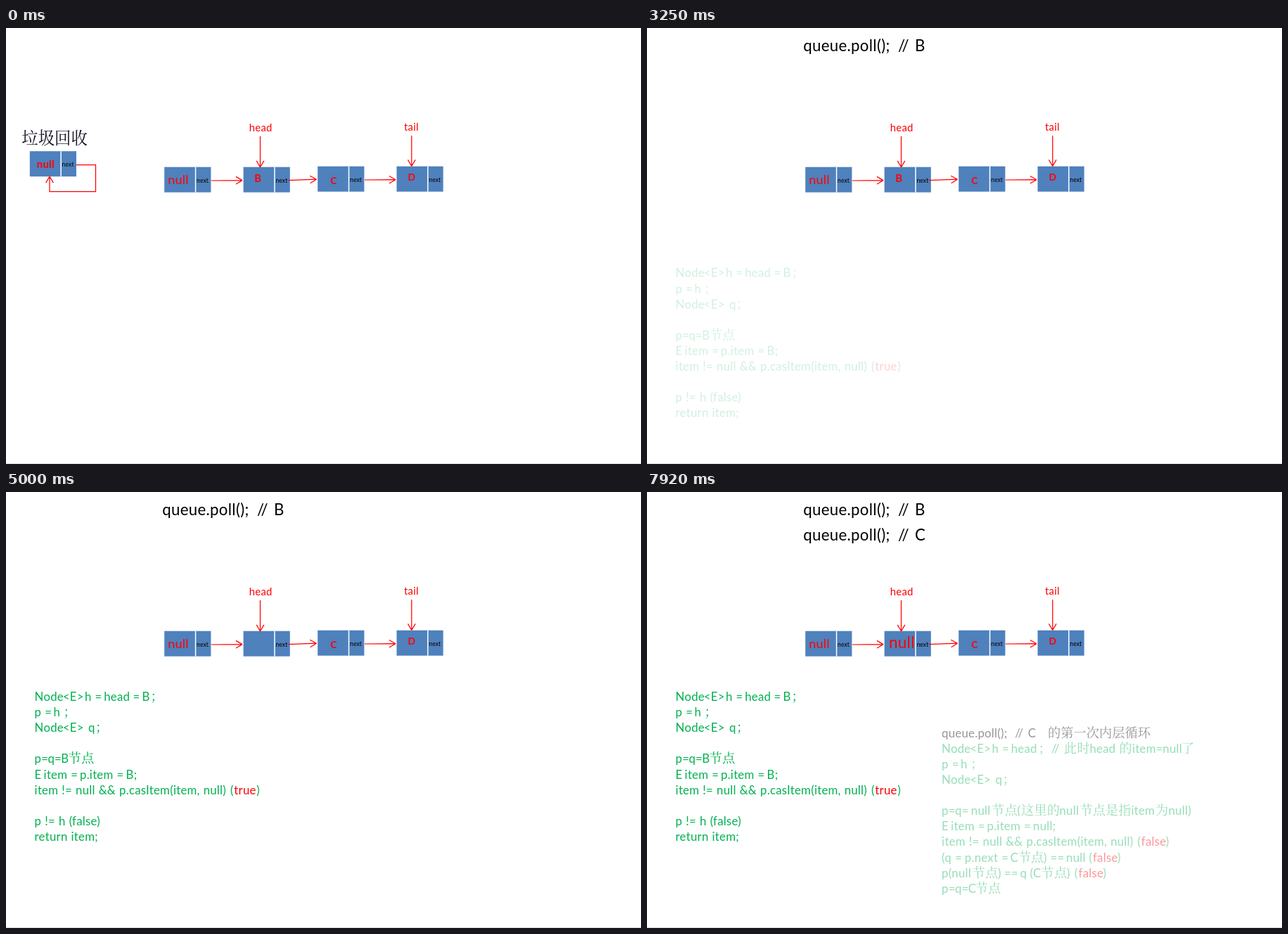
Recreate the animation shown at these times as an HTML page with a canvas. Size 903x620 px, loop 8000 ms.

```html
<!DOCTYPE html>
<html lang="zh">
<head>
<meta charset="utf-8">
<title>Linked queue poll</title>
<style>
  html, body { margin: 0; width: 100%; height: 100%; overflow: hidden; background: #fff; }
  canvas { display: block; }
</style>
</head>
<body>
<canvas id="stage" width="903" height="620"></canvas>
<script>
const ctx = document.getElementById('stage').getContext('2d');
const LOOP = 8000, W = 903, H = 677;   // H: full slide height, the stage crops it
const RED = '#ff0000', GREEN = '#00b050', BLUE = '#4f81bd';
const LATIN = 'Lato, "Open Sans", sans-serif';
const HAN = '"Noto Serif CJK SC", "Noto Sans CJK SC", "Noto Sans CJK", sans-serif';
const LINE = 22.1;

const clamp = v => Math.max(0, Math.min(1, v));
const ramp = (t, start, dur) => clamp((t - start) / dur);

// Motion advances in 80 ms ticks, restarted at the beginning of each scene.
const scenes = [0, 2530, 3410, 4220, 5560, 6810, 7680];
function tick(t) {
  const s = scenes.filter(v => v <= t).pop();
  return s + Math.floor((t - s) / 80) * 80;
}

// Piecewise linear curve through [x, y] points.
function curve(points, u) {
  u = clamp(u);
  for (let i = 1; i < points.length; i++) {
    const [x0, y0] = points[i - 1], [x1, y1] = points[i];
    if (u <= x1) return y0 + (y1 - y0) * (u - x0) / (x1 - x0);
  }
  return 1;
}

const fall = u => curve([[0, 0], [.25, .07], [.5, .2], [.75, .467], [1, 1]], u);
const hop = u => u < .5 ? (1 - fall(1 - 2 * u)) / 2 : .5 + fall(2 * u - 1) / 2;
const glide = (u, first) => curve([[0, 0], [.14, first], [.43, .73], [.71, .91], [1, 1]], u);

// Height above the resting place while bouncing in, as a share of the slide.
function bounce(a) {
  const arc = (p, size) => Math.sin(Math.PI * p) / size;
  if (a < 332) return arc(.5 + fall(a / 332) / 2, 3);
  if (a < 662) return arc(hop((a - 332) / 330), 9);
  if (a < 828) return arc(hop((a - 662) / 166), 27);
  if (a < 911) return arc(hop((a - 828) / 83), 81);
  return 0;
}

// Latin text is set slightly smaller with a little tracking.
function text(str, x, y, size, color, weight = 400, align = 'left') {
  const han = /[\u3000-\uffff]/.test(str);
  ctx.font = han ? `300 ${size}px ${HAN}` : `${weight} ${size * .918}px ${LATIN}`;
  ctx.letterSpacing = han ? '0px' : size * .0137 + 'px';
  ctx.wordSpacing = han ? '0px' : size * .025 + 'px';
  ctx.textAlign = align;
  ctx.fillStyle = color;
  ctx.fillText(str, x, y);
}

const label = (str, x, y, size, weight) => text(str, x, y, size, RED, weight, 'center');

// Polyline ending in an open arrowhead.
function arrow(...pts) {
  const [x, y] = pts[pts.length - 1], [px, py] = pts[pts.length - 2];
  const dir = Math.atan2(y - py, x - px);
  ctx.strokeStyle = RED;
  ctx.lineWidth = 1.25;
  ctx.beginPath();
  pts.forEach(p => ctx.lineTo(...p));
  for (const side of [-1, 1]) {
    const a = dir + Math.PI + side * .53;
    ctx.moveTo(x, y);
    ctx.lineTo(x + 10.5 * Math.cos(a), y + 10.5 * Math.sin(a));
  }
  ctx.stroke();
}

function node(x, y, withText = true) {
  ctx.fillStyle = BLUE;
  ctx.fillRect(x, y, 66.2, 36);
  ctx.fillStyle = '#fff';
  ctx.fillRect(x + 43.6, y, 1.5, 36);
  if (withText) text('next', x + 54.3, y + 22, 9.3, '#000', 400, 'center');
}

function garbage(t, raw) {
  const alpha = clamp(1 - t / 900);
  if (raw < 960) {
    ctx.globalAlpha = alpha;
    text('垃圾回收', 22.3, 165, 23.4, '#111122');
    arrow([100, 194.5], [127.5, 194.5], [127.5, 232.5], [62, 232.5], [62, 211]);
  }
  // A faint trace of the box lingers and dies in steps.
  const trace = raw < 1270 ? .05 : raw < 1510 ? .035 : raw < 1750 ? .02 : raw < 1980 ? .01 : 0;
  ctx.globalAlpha = Math.max(raw < 960 ? alpha : 0, trace);
  if (ctx.globalAlpha > 0) {
    node(33.8, 175.2, raw < 1030);
    if (raw < 1030) label('null', 56.3, 199, 16.2, 700);
  }
  ctx.globalAlpha = 1;
}

function list() {
  node(225.2, 197.7);
  node(337.6, 197.7);
  node(443.2, 196.7);
  node(555.5, 196.7);
  label('null', 245, 221.8, 19.6);
  label('C', 465.9, 222.4, 15, 700);
  label('D', 576.8, 217.3, 15, 700);
  arrow([292, 217], [336, 216.6]);
  arrow([400.5, 216.6], [441.5, 215.2]);
  arrow([510, 216], [554, 215.7]);
  label('head', 362.2, 147, 16.2);
  label('tail', 576.4, 145.8, 16.2);
  arrow([361.5, 154], [361.5, 198]);
  arrow([576.8, 153], [576.8, 196.5]);
}

function call(letter, y) {
  text('queue.poll();', 222.2, y, 24.2, '#000');
  text('//', 357, y, 24.2, '#000');
  text(letter, 381, y, 24.2, '#000');
}

// Each line alternates x offset and text; '*' marks red, '#' black.
function block(lines, x, y) {
  lines.forEach((line, row) => {
    for (let i = 0; i < line.length; i += 2) {
      const mark = line[i + 1][0];
      const color = mark === '*' ? RED : mark === '#' ? '#000' : GREEN;
      text(line[i + 1].replace(/^[*#]/, ''), x + line[i], y + row * LINE, 18.3, color);
    }
  });
}

const type = [0, 'Node', 40.2, '<E>'];
const setH = [...type, 71.4, 'h =', 98.6, 'head'];
const setP = [0, 'p =', 26.9, 'h', 41, '；'];
const setQ = [...type, 76.5, 'q', 86.5, '；'];
const getItem = [0, 'E', 13, 'item =', 64.4, 'p.item ='];
const cas = [0, 'item != null && p.casItem(item, null)', 278.5, '('];
const first = [
  [...setH, 139.8, '=', 153, 'B', 165, '；'],
  setP,
  setQ,
  [],
  [0, 'p=', 18.8, 'q=', 37.6, 'B', 48, '节点'],
  [...getItem, 130, 'B;'],
  [...cas, 283.7, '*true', 315.7, ')'],
  [],
  [0, 'p != h (false)'],
  [0, 'return item;']
];
const second = [
  [0, '#queue.poll();', 104.2, '#//', 122.6, '#C', 150.8, '#的第一次内层循环'],
  [...setH, 137.5, '；', 155.8, '//', 174, '此时', 210.4, 'head', 252.5, '的', 271, 'item=', 314.2, 'null', 341, '了'],
  setP,
  setQ,
  [],
  [0, 'p=', 18.8, 'q=', 41.7, 'null', 71, '节点', 107.4, '(', 113, '这里的', 167.4, 'null',
    196.4, '节点是指', 269.4, 'item', 303.9, '为', 322.4, 'null)'],
  [...getItem, 130, 'null;'],
  [...cas, 283.7, '*false', 318.7, ')'],
  [0, '(q =', 32.7, 'p.next =', 97.4, 'C', 108.6, '节点', 144.9, ')', 154.5, '==', 177, 'null',
    209.4, '(', 214.9, '*false', 249.9, ')'],
  [0, 'p(null', 43.5, '节点', 79.9, ')', 89, '==', 111.5, 'q', 125.5, '(C', 141.5, '节点', 178, ')',
    189, '(', 194.5, '*false', 229.5, ')'],
  [0, 'p=', 18.8, 'q=', 37.6, 'C', 47.7, '节点']
];

// Code rises by a tenth of the slide while fading in.
function rise(lines, x, y, t, start) {
  const alpha = ramp(t, start, 1250);
  if (!alpha) return;
  ctx.globalAlpha = alpha;
  block(lines, x, y + (1 - ramp(t, start + 40, 1250)) * H * .1);
  ctx.globalAlpha = 1;
}

function letterB(t, raw) {
  let dx = 0, dy = 0;
  if (raw >= 5000 && (raw < 5250 || raw >= 5380)) return;
  if (raw < 5000) {
    const a = Math.max(0, Math.min(t, 4850) - 4275);
    dx = W * .25 * glide(a / 911, .31);
    dy = 151 * (a / 575) ** 2;
  }
  label('B', 358.2 + dx, 218.6 + dy, 16, 700);
}

function draw(raw) {
  const t = tick(raw);
  ctx.globalAlpha = 1;
  ctx.fillStyle = '#fff';
  ctx.fillRect(0, 0, W, 620);
  ctx.fillStyle = '#d9d9d9';
  ctx.fillRect(0, 619, W, 1);

  garbage(t, raw);
  list();
  if (raw >= 2530) call('B', 33 - 45 * (1 - ramp(t, 2440, 650)));
  if (raw >= 6810) call('C', 69 - 81 * (1 - ramp(t, 6680, 720)));
  rise(first, 40.6, 297, t, 3020);
  rise(second, 419.1, 307, t, 7400);
  letterB(t, raw);
  if (raw >= 5560) {
    const a = t - 5371;
    const dx = W * .25 * (1 - glide(a / 911, .36));
    label('null', 362.4 - dx, 222.4 - H * bounce(a), 24.4);
  }
}

const begin = performance.now();
function frame() {
  draw((performance.now() - begin) % LOOP);
  requestAnimationFrame(frame);
}
frame();
</script>
</body>
</html>
```
